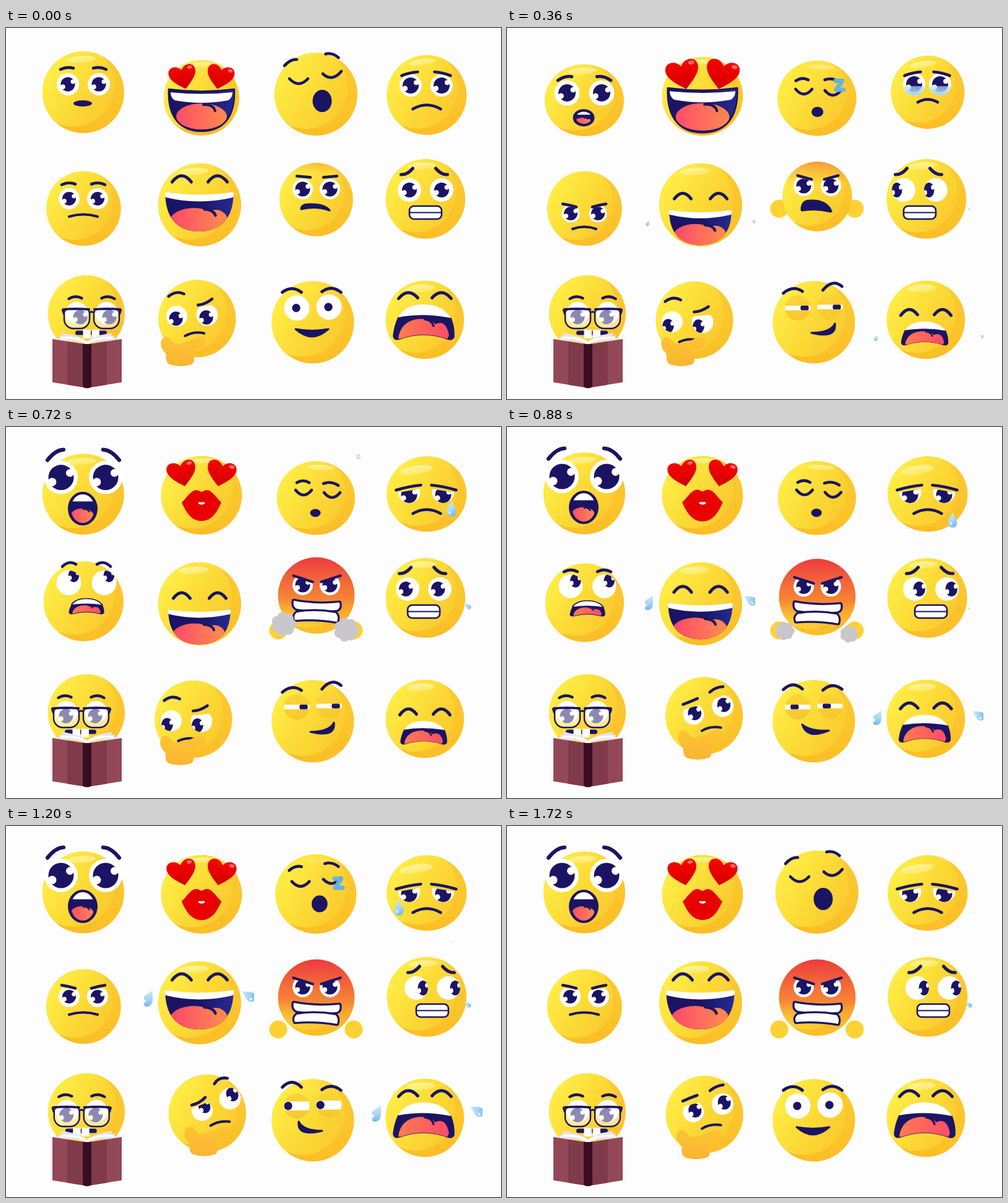
An HTML page with a canvas that plays this animation: 800x600 px, repeating every 1760 ms.

```html
<!DOCTYPE html>
<html lang="en">
<head>
<meta charset="utf-8">
<title>Emoji faces</title>
<style>
html,body{margin:0;width:100%;height:100%;overflow:hidden;background:#fdfdfd}
canvas{display:block;width:100vw;height:100vh}
</style>
</head>
<body>
<canvas id="stage" width="800" height="600"></canvas>
<script>
const g = document.getElementById('stage').getContext('2d');
const LOOP = 1760, STEP = 40, NAVY = '#1b1464', SIDES = [-1, 1];

// Motion: every pose is a sum of eased ramps (0 to 1) and pulses (0 to 1 to 0)
const mix = (a, b, u) => a + (b - a) * u;
function ramp(t, from, to) {
  const u = Math.min(1, Math.max(0, (t - from) / (to - from)));
  return u * u * (3 - 2 * u);
}
const pulse = (t, a, b, c, d) => ramp(t, a, b) - ramp(t, c, d);

// Drawing helpers
function ovalPath(x, y, rx, ry = rx) {
  const p = new Path2D();
  p.ellipse(x, y, Math.max(rx, 0), Math.max(ry, 0), 0, 0, 7);
  return p;
}
function fill(path, color) {
  g.fillStyle = color;
  g.fill(typeof path === 'string' ? new Path2D(path) : path);
}
const oval = (x, y, rx, ry, color) => fill(ovalPath(x, y, rx, ry), color);
function line(path, width, color = NAVY) {
  g.strokeStyle = color;
  g.lineWidth = width;
  g.lineCap = g.lineJoin = 'round';
  g.stroke(typeof path === 'string' ? new Path2D(path) : path);
}
// A bowed stroke around its centre; slope is the drop of the right end
function arc(x, y, half, slope, bulge, width = 4.6) {
  line(`M${x - half} ${y - slope}Q${x} ${y - 2 * bulge} ${x + half} ${y + slope}`, width);
}
// Two mirrored strokes; tilt lowers the outer ends
function arcPair(x, gap, y, half, tilt, bulge, width) {
  for (const s of SIDES) arc(x + s * gap, y, half, s * tilt, bulge, width);
}
function within(path, draw) {
  g.save();
  g.clip(path);
  draw();
  g.restore();
}
function placed(x, y, sx, sy, rot, draw) {
  g.save();
  g.translate(x, y);
  g.rotate(rot);
  g.scale(sx, sy);
  draw();
  g.restore();
}
function faded(alpha, draw) {
  g.save();
  g.globalAlpha = Math.min(1, Math.max(0, alpha));
  draw();
  g.restore();
}
function grad(x1, y1, x2, y2, ...colors) {
  const f = g.createLinearGradient(x1, y1, x2, y2);
  colors.forEach((c, i) => f.addColorStop(i / (colors.length - 1), c));
  return f;
}

// Shared parts
function ball(x, y, rx, ry = rx) {
  const body = ovalPath(x, y, rx, ry);
  fill(body, grad(x + rx * .4, y - ry, x, y + ry, '#fbcb30', '#fbbe27'));
  within(body, () => oval(x - rx * .24, y - ry * .17, rx * 1.01, ry * 1.01,
    grad(x - rx * .8, y - ry * .5, x + rx * .8, y + ry * .5, '#ffec45', '#fcd935', '#fac72f')));
}
function shine(x, y, rx = 23, ry = 5.5, rot = -.06) {
  placed(x, y, 1, 1, rot, () => oval(0, 0, rx, ry,
    grad(0, -ry, 0, ry, 'rgba(255,252,220,.6)', 'rgba(255,248,180,.35)')));
}
function pupil(x, y, r, squash = 1) {
  placed(x, y, squash, 1, 0, () => {
    oval(0, 0, r, r, NAVY);
    oval(r * .7, -r * .36, r * .31, r * .31, '#fff');
    oval(-r * .7, r * .36, r * .33, r * .33, '#fff');
  });
}
// dx, dy: gaze; left, right: height of the upper lid at either rim; low: lower lid
function eye(x, y, r, {dx = 0, dy = 0, pr = r * .7, left = -r, right = -r, low = r} = {}) {
  const gap = new Path2D(`M${x - r} ${y + left}L${x + r} ${y + right}V${y + low}H${x - r}Z`);
  within(gap, () => {
    oval(x, y, r, r, '#fff');
    within(ovalPath(x, y, r), () => pupil(x + dx, y + dy, pr, 1 - .5 * Math.abs(dx) / r));
  });
}
function eyePair(x, gap, y, r, {outer = -r, inner = -r, ...look} = {}) {
  eye(x - gap, y, r, {...look, left: outer, right: inner});
  eye(x + gap, y, r, {...look, left: inner, right: outer});
}
function drop(x, y, size, rot = 0) {
  if (size <= 0) return;
  placed(x, y, size, size, rot, () => {
    fill('M0-1C.2-.5.6-.1.6.4A.6.6 0 0 1-.6.4C-.6-.1-.2-.5 0-1Z',
      grad(-.5, -.6, .5, .9, '#c9e7fa', '#a5d5f3', '#6fb4e4'));
    oval(-.22, .5, .13, .2, 'rgba(255,255,255,.75)');
  });
}
const tongueFill = half => grad(-half, 0, half, 0, '#ff4d68', '#ff8a50');
const mouthFill = half => grad(-half, 0, half, 0, NAVY, NAVY, '#252a92');

function sobMouth(x, y, sx, sy, outlined) {
  placed(x, y, sx, sy, 0, () => {
    const teeth = 'M-41-7Q-30-28 0-28Q30-28 44-6Q0-15-41-7Z';
    const inside = 'M-41-7Q0-15 44-6Q50 10 49 25Q46 31 38 28Q0 14-38 28Q-49 31-49 22Q-47 6-41-7Z';
    if (outlined) line(teeth, 7);
    line(inside, outlined ? 4 : 1.5);
    fill(inside, NAVY);
    fill(teeth, '#fff');
    fill('M-41 27C-37-2-12-6 2-4Q14-2 19 4Q36-4 41 22L38 28Q0 14-38 28Z',
      grad(-40, 0, 40, 0, '#ff7a50', '#ff4d68'));
    line('M2-4Q14-2 16 7', 3.5);
  });
}
function flyingTears(t, dx, dy) {
  const tile = new Path2D();
  tile.rect(223 + dx, 200 + dy, 178, 170);
  within(tile, () => [180, 820, 1160].forEach(start => {
    const u = (t - start) / 220;
    if (u < 0 || u > 1) return;
    drop(231 - 4 * u + dx, 268 + 58 * u + dy, 17 - 15 * u, .5);
    drop(390 + 11 * u + dx, 263 + 61 * u + dy, 15 - 13 * u, -1);
  }));
}
const sobbing = t => pulse(t, 0, 400, 760, 1060);

// Faces, row by row
function surprised(t) {
  const fear = ramp(t, 0, 700) ** 2, duck = pulse(t, 0, 320, 380, 800), x = 125;
  const cy = 104 + 3.5 * fear + 12 * duck, ry = 66 - 8 * duck;
  ball(x, cy, 66 - 2 * duck, ry);
  shine(x - 3, cy - ry * .81);
  eyePair(x, 25 + 11 * fear, 91 - 11 * fear + 17 * duck, 18 + 9 * fear, {pr: 11.5 + 9 * fear});
  arcPair(x, 26.5 + 18.5 * fear, 66 - 23 * fear + 22 * duck, 10.5 + 2.5 * fear, 1 + 7.5 * fear, 2 + 2 * fear, 4.6 + 1.6 * fear);
  const w = 15 + 9 * fear, h = 5 + 22 * fear + 3 * duck;
  placed(124, 122 + 8 * fear + 21 * duck, 1, 1, 0, () => {
    oval(0, 0, w, h, NAVY);
    const iw = w - 5, ih = h - 4;
    if (ih > 3) within(ovalPath(0, 0, iw, ih), () => {
      g.fillStyle = '#fff';
      g.fillRect(-iw, -ih, 2 * iw, ih * .5);
      oval(-1, ih * .52, iw, ih * .53, tongueFill(iw));
      arc(iw * .3, ih * .12, iw * .25, ih * .08, ih * .08, w / 9);
    });
  });
}

function heart(x, y, size, rot) {
  placed(x, y, size, size, rot, () => {
    fill('M0 20C-8 13-22 3-22-8C-22-20-7-22 0-11C7-22 22-20 22-8C22 3 8 13 0 20Z',
      grad(0, -18, 0, 20, '#f50505', '#e60000', '#cd0008'));
    oval(14, -13, 4, 2.5, 'rgba(255,150,150,.7)');
  });
}
function lovestruck(t) {
  const love = ramp(t, 0, 360), swell = pulse(t, 0, 320, 400, 680), x = 316;
  ball(x, 113 - 2.5 * love, 61 + 4.4 * love, 61 + 2.5 * love);
  shine(x, 59 - 4 * love, 20, 4);
  if (t < 520) {
    const size = 1 + .06 * love - .55 * ramp(t, 400, 520);
    placed(x, 132, size, size, 0, () => {
      const open = new Path2D('M-53-33Q0-26 53-33C55 13 34 35 0 35C-34 35-55 13-53-33Z');
      fill(open, mouthFill(53));
      within(open, () => {
        oval(0, 11, 41, 21, tongueFill(41));
        line('M3-8Q19-9 22 2', 4);
      });
      line(open, 2.5);
      fill('M-50-28Q0-23 50-28Q50-19 43-15Q0-7-43-15Q-50-19-50-28Z', '#fff');
    });
  } else {
    const size = ramp(t, 440, 700) + .08 * pulse(t, 800, 1000, 1020, 1240);
    placed(x, 127, size, size, 0, () => {
      fill('M-32-5C-24-12-18-24-9-25C-4-25-2-22 0-22C2-22 4-25 9-25C18-24 24-12 32-5C26 8 18 25 0 25C-18 25-26 8-32-5Z', '#e80000');
      fill('M-6-4Q-3-7 0-5Q3-7 6-4Q0 1-6-4Z', '#fff');
    });
  }
  for (const s of SIDES) heart(x + s * (30 + 1.5 * love), 79 - 4 * love, 1 + .07 * love + .15 * swell, s * .22);
}

function sleepy(t) {
  const out = pulse(t, 0, 480, 840, 1460), at = (a, b) => mix(a, b, out);
  const cy = at(107, 115), ry = at(67, 59.5);
  ball(501, cy, at(67, 63), ry);
  faded(out, () => shine(508, cy - ry * .83, 22, 4, .05));
  arc(at(473, 481), at(82, 102), at(15, 13), 0, -8);
  arc(527, at(72, 106), at(15, 13), at(-2, 0), -8);
  arc(at(460, 480), at(56, 90), 10, at(-5, 0), 3);
  arc(at(527, 525), at(45, 93), at(10.5, 12), at(3, 1.5), 3);
  oval(at(511, 500), at(118, 139), at(15.5, 8.5), at(18, 6.5), NAVY);
  for (const start of [160, 1000, 1280]) {
    const age = t - start, size = ramp(age, 0, 180) * (1.3 - age / 600);
    if (age < 0 || age > 600) continue;
    faded(size * (1 - ramp(t, 1560, 1700)), () =>
      placed(519 + age * .09, 118 - age * .125, size, size, 0, () => line('M-6-8H5L-5 7H7', 7.5, '#64b3e6')));
  }
}

function sad(t) {
  const sob = pulse(t, 0, 300, 400, 640), weary = ramp(t, 440, 700), squint = pulse(t, 880, 1000, 1020, 1140);
  const cy = 108.5 - 4.5 * sob, x = 679, gap = 25 - 4 * sob + 2.5 * weary;
  const ey = 93 - 2 * sob + 12 * weary, r = 18;
  ball(680, cy, 64.5 - 5 * sob, 64.5 - 5.5 * sob - 3.5 * weary);
  shine(672 - 9 * weary, cy - 53 + 8 * sob + 14 * weary, 22 + 5 * weary, 5 + 2 * weary, -.15);
  eyePair(x, gap, ey, r, {
    dy: 5 * weary, pr: 13,
    outer: mix(-r, 1, weary), inner: mix(-r, -5, weary) + 3 * squint, low: r - 8 * squint
  });
  faded(sob, () => SIDES.forEach(s => within(ovalPath(x + s * gap, ey, r), () => {
    g.fillStyle = grad(0, ey, 0, ey + r, 'rgba(190,228,250,.55)', '#9fd3f3');
    g.fillRect(x + s * gap - r, ey + 3, 2 * r, r);
  })));
  arcPair(x, 26.5 + 2 * weary - 3 * sob, 74 + 24 * weary, 13 + 7 * weary, 3 + weary, 1);
  arc(680, 131 - 11 * sob + 9 * weary, 22.5 - 6.5 * sob, 0, 6.5 - 2 * sob);
  for (const [tx, start] of [[720, 720], [635, 1200]])
    drop(tx, 132 + .115 * (t - start), 13 * pulse(t, start - 120, start, start + 100, start + 560));
}

function grumpy(t) {
  const sulk = pulse(t, 0, 280, 380, 560), startle = pulse(t, 480, 680, 760, 1140);
  const look = pulse(t, 480, 680, 1020, 1140), cross = ramp(t, 400, 1000);
  const x = 125 + 5 * look, er = 17 - 2.5 * sulk + 3 * startle;
  ball(125.5, 292 - 10 * startle, 60.3 + 4.2 * startle);
  eyePair(x, 23 + 5.5 * startle - sulk, 276 + 24 * sulk - 24 * startle, er, {
    dx: 8 * look, dy: -12 * startle, pr: 11,
    outer: -20 + 6 * cross + 7 * sulk - 12 * startle, inner: -20 + 9 * cross + 12 * sulk - 15 * startle
  });
  arcPair(x, 24 + 4 * startle, 253 + 34 * sulk - 33 * startle + 7 * cross, 11, .5 - 3 * Math.max(sulk, cross) + 3 * startle, 2.5 - 2 * Math.max(sulk, cross) + 3 * startle);
  const my = 305 + 20 * sulk - 15 * startle;
  if (startle > .15) sobMouth(x, my, .56, .42 * Math.min(1, 3 * startle), true);
  else arc(125, my, 23 - 4 * sulk, 0, 3.5, 4.2);
}

function laughing(t) {
  const p = sobbing(t);
  flyingTears(t, 0, 0);
  ball(313, 286, 67);
  shine(303, 232, 24, 6);
  arcPair(313, 29, 249 + 28 * p, 15.5 - 2 * p, 0, 10 - p, 5);
  placed(312.5, 264 + 30 * p, 1 - .09 * p, 1 - .12 * p, 0, () => {
    const open = new Path2D('M-55 1Q0 12 55 1C56 42 36 65 0 65C-36 65-56 42-55 1Z');
    fill(open, mouthFill(55));
    within(open, () => {
      oval(26, 48, 20, 18, '#ff8552');
      oval(-9, 49, 39, 22, tongueFill(40));
      line('M8 29Q23 30 26 39', 4.5);
    });
    fill('M-55 1Q0 10 55 1Q57 7 54 10Q0 23-54 10Q-57 7-55 1Z', '#fff');
  });
}

function smoke(x, y, r) {
  for (let a = 0; a < 6; a += Math.PI * 2 / 7)
    oval(x + Math.cos(a) * r * .6, y + Math.sin(a) * r * .56, r * .42, r * .42, '#c9c7cc');
  oval(x, y, r * .6, r * .6, '#c9c7cc');
}
function angry(t) {
  const tense = ramp(t, 0, 360), rage = ramp(t, 300, 700), lift = 5 * pulse(t, 0, 300, 760, 1000);
  const x = 501.5, cy = 277.5 - lift, r = 59.3 - 3.3 * pulse(t, 0, 320, 380, 640) + 2.5 * rage;
  const red = .15 * tense + .85 * rage;
  for (const s of SIDES) oval(501 + s * (35 + 26 * tense), 285 + 5 * tense + 39 * rage, 14.5, 14.5, '#ffd133');
  ball(x, cy, r);
  const flush = g.createLinearGradient(0, cy - r, 0, cy + r);
  flush.addColorStop(0, `rgba(238,58,64,${Math.min(1, .25 + red)})`);
  flush.addColorStop(mix(.15, .55, red), `rgba(245,125,52,${red * .9})`);
  flush.addColorStop(mix(.2, 1, red), 'rgba(253,195,44,0)');
  oval(x, cy, r, r, flush);
  eyePair(x, 22, 260.5 - lift, 16.5, {pr: 12, outer: -18 + 4 * tense, inner: -18 + 9 * tense + 5 * rage});
  arcPair(x + 1, 21.5 + rage, 240.5 + 6 * tense + 4 * rage - lift, 11 + 4.5 * rage, -1 - 2 * tense - 2 * rage, 0, 4.4);
  if (t < 480) {
    const low = 293 + tense, top = 285 - 5 * tense;
    const lips = `M477 ${low}Q477 ${top} 490 ${top}Q515 ${top - 1} 523 ${low + 2}Q500 ${287 + 3 * tense} 477 ${low}Z`;
    fill(lips, NAVY);
    line(lips, 3 + 2 * tense);
  } else {
    const size = mix(.65, 1, rage);
    placed(501, 302 - lift, size, size, 0, () => [
      'M-36-16Q0-9 38-13Q40-3 33-1Q0 2-31-3Q-38-6-36-16Z',
      'M-31 3Q0-2 32 4Q37 10 34 18Q0 12-34 15Q-37 8-31 3Z'
    ].forEach(row => {
      line(row, 6.5);
      fill(row, '#fff');
    }));
  }
  const rise = t - 720;
  smoke(449, 319 + .067 * rise, 20 * pulse(t, 480, 660, 720, 1240));
  smoke(550 + .018 * rise, 328 + .043 * rise, 20 * pulse(t, 480, 660, 720, 1180));
}

function nervous(t) {
  const right = ramp(t, 760, 960), look = 11 * (right - pulse(t, 0, 200, 480, 840));
  const x = 678 + 2 * right, face = 678 + look;
  const body = ovalPath(x, 276.5, 64.3);
  ball(x, 276.5, 64.3);
  shine(x - 6, 223);
  within(body, () => eyePair(face, 26, 262, 19, {dx: look, pr: 12}));
  arcPair(face - 2, 28, 232, 9.5, 5, -3, 5);
  const teeth = new Path2D();
  teeth.roundRect(face - 26, 288, 52, 21, 7);
  fill(teeth, '#fff');
  line(teeth, 2.6);
  arc(face, 298.5, 25, 0, 0, 2);
  const age = (t + 40) % 520, slide = ramp(age, 20, 210), swell = ramp(age, 460, 520);
  if (t < 240) return;
  if (swell > 0) drop(732, 246, 17 * swell, -.85);
  else drop(732 + 14 * slide, 246 + 39 * slide + .02 * age, 17 - 11 * slide - 6 * ramp(age, 300, 460), -.85);
}

function reading(t) {
  const shift = -17 * pulse(t, 420, 680, 1120, 1740), look = -6 * ramp(t, 0, 300);
  ball(130, 462, 62);
  placed(138.5 + shift, 0, 1, 1, 0, () => {
    for (const s of SIDES) oval(s * 24, 461, 18, 18, '#fff');
    for (const s of SIDES) pupil(5 + s * 23.5 + look, 467.5, 11.5);
    arcPair(0, 26.5, 437.5, 10.5, .5, 3, 4.4);
    line('M-23 493H21', 7);
    g.fillStyle = '#fff';
    for (const x of [-14, 0]) g.fillRect(x, 488, 12.5, 14);
    for (const s of SIDES) placed(s * 24, 455, s, 1, 0, () => {
      const lens = new Path2D();
      lens.roundRect(-20.5, 0, 41, 31, [6, 6, 15, 15]);
      fill(lens, 'rgba(255,255,255,.5)');
      line(lens, 2.4);
      arc(1, 0, 21, 0, 1, 3.4);
      line('M23 1L21 7', 3.4);
    });
    arc(0, 460, 3.5, 0, 1, 3);
  });
  for (const s of SIDES) placed(131, 0, s, 1, 0, () => {
    fill('M0 512Q-15 505-54 506L-44 501L-45 497L-39 498L-41 493Q-13 497 0 507Z', '#e4e4ec');
    fill('M0 512Q-15 501-46 503L-39 499Q-13 498 0 507Z', '#fbfbfd');
    fill('M-56 503L0 512V582L-56 573Z', '#934858');
    fill('M-32 507L0 512V582L-32 577Z', '#803b4a');
    fill('M0 511Q-5 512-7 510V580Q-4 583 0 582.5Z', '#3b0d22');
  });
}

function thinking(t) {
  const doubt = pulse(t, 0, 240, 740, 960), wonder = pulse(t, 740, 960, 1620, 1860);
  const x = 309 - 6 * doubt + 16.5 * wonder, y = 470 + 2.5 * doubt - 5.5 * wonder;
  ball(x, y, 62.5);
  placed(x - 8.5 - 3 * doubt + 22.5 * wonder, y - 5 + 8 * doubt - 9 * wonder, 1, 1, -.04 + .06 * doubt - .36 * wonder, () => {
    const look = {dx: -1.5 - 5 * doubt + 7.5 * wonder, dy: 4 + 3 * doubt - 9 * wonder, pr: 11.5};
    const droop = -18 + 9 * wonder, frown = -15 + 4 * doubt - 3 * wonder;
    eye(-24.5, 0, 17, {...look, left: droop, right: droop});
    eye(24.5, 0, 17.5, {...look, left: frown + 2, right: frown - 2});
    arc(-24, -34 + 18 * wonder, 12.5, -1.5, 4 - 6 * wonder);
    arc(22, -21 - 11 * wonder, 11.5, -4.5 * (1 - wonder), -2 + 6 * wonder);
    arc(3 - 9 * wonder, 31, 15.5, -1.5 + 4.5 * wonder, 3, 4);
  });
  placed(282 - doubt + 38 * wonder, 525 - 13 * wonder, 1, 1, 0, () => fill(
    'M-32-15Q-30-28-20-25Q-14-21-10-14Q10-15 25-24Q40-28 41-18Q40-9 24-4Q20-2 21 3Q24 16 18 19Q0 25-18 19Q-25 15-23 2Q-32-6-32-15Z',
    grad(0, -26, 0, 22, '#fcc433', '#fbb433')));
}

function smirking(t) {
  const right = pulse(t, 120, 320, 760, 960), left = pulse(t, 760, 960, 1200, 1420);
  const gap = 21 * (1 - .82 * pulse(t, 120, 320, 1120, 1400)), look = 12 * right - 13 * left;
  ball(496, 476, 66.5);
  for (const s of SIDES) {
    const x = 496 + 26 * s, y = 452 - .8 * s, lens = ovalPath(x, y, 20.5);
    if (gap < 20) fill(lens, grad(x, y - 20, x + 10, y + 20, '#fbd438', '#f6c72f'));
    const slit = new Path2D();
    slit.rect(x - 21, y - gap, 42, 2 * gap);
    within(slit, () => {
      fill(lens, '#fff');
      within(lens, () => oval(x - 1 + look, y, 6.7, 6.7, NAVY));
    });
  }
  arc(462, 427.5 - 5 * left, 15.5, -1.5 * right, 6 + 2 * left, 4.8);
  arc(526, 427 - 6 * right, 15.5, .5 - 3.5 * right, 6 + 2 * right, 4.8);
  const k = Math.max(right, left), side = right >= left ? 1 : -1;
  placed(494.5 + 16.5 * right - 2.5 * left, 487, side, 1, 0, () => {
    const half = 26.5 - 7.5 * k, a = `${-half} ${6 * k}`;
    const mouth = `M${a}Q${12 * k} ${5 + k} ${half} ${-9 * k}Q${22 * k} ${24 - 8 * k} ${a}Z`;
    fill(mouth, NAVY);
    line(mouth, 3);
  });
}

function crying(t) {
  const p = sobbing(t);
  flyingTears(t, 369, 186);
  ball(677, 472, 63.3);
  shine(670, 421, 23, 6);
  arcPair(677, 27, 437 + 28 * p, 15.5 - 2 * p, .5, 9, 5);
  sobMouth(675, 475 + 19 * p, 1 - .24 * p, 1 - .34 * p, false);
}

const faces = [surprised, lovestruck, sleepy, sad, grumpy, laughing, angry, nervous, reading, thinking, smirking, crying];
const began = performance.now();
function frame() {
  const t = Math.floor((performance.now() - began) % LOOP / STEP) * STEP;
  g.fillStyle = '#fdfdfd';
  g.fillRect(0, 0, 800, 600);
  for (const face of faces) face(t);
  requestAnimationFrame(frame);
}
frame();
</script>
</body>
</html>
```
